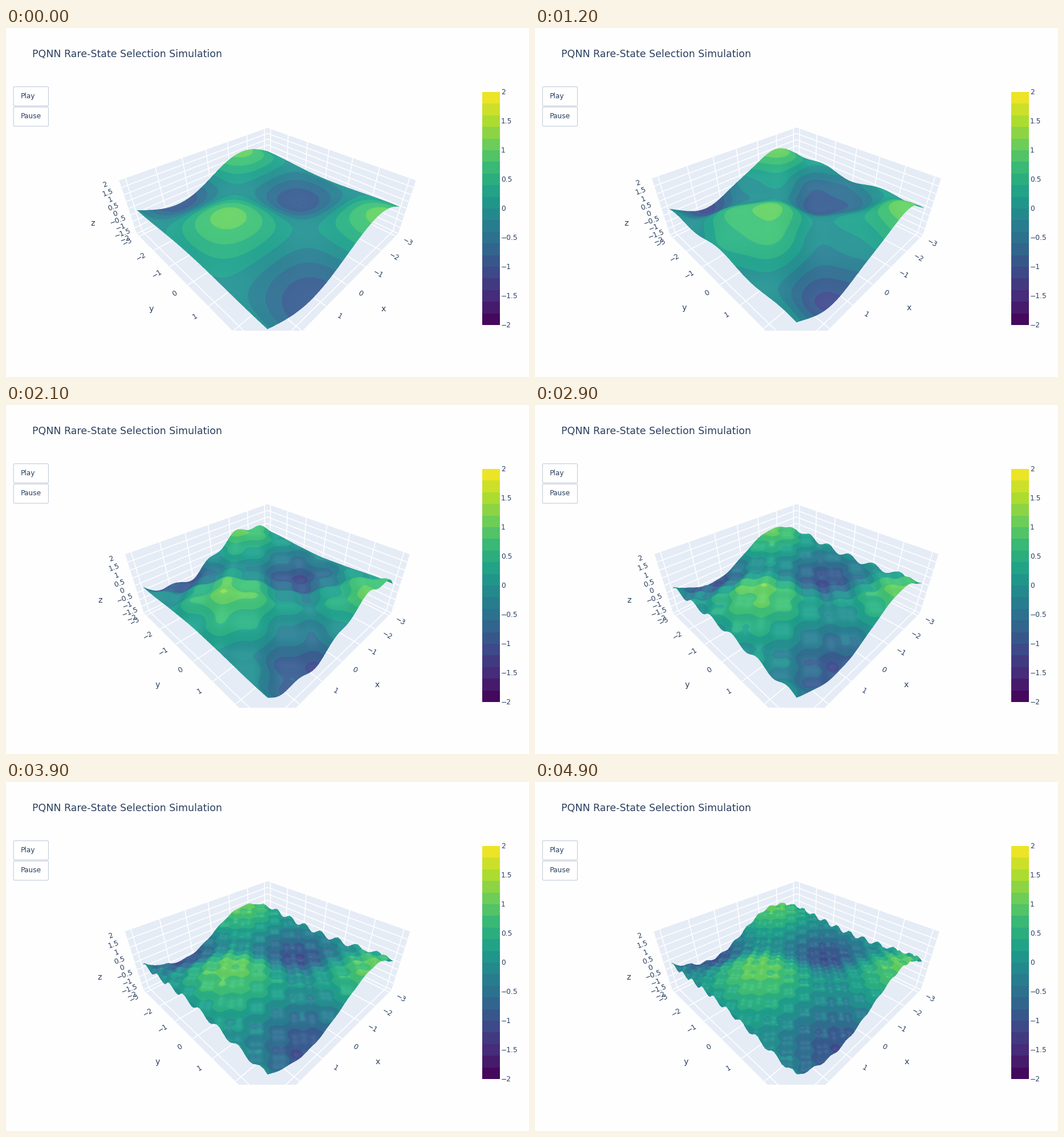
Recreate the animation shown at these times as a matplotlib script. Size 917 px wide and 611 px high, loop 5000 ms.

```python
import numpy as np
import matplotlib.pyplot as plt
from matplotlib.animation import FuncAnimation
from matplotlib.collections import LineCollection
from matplotlib.colors import to_rgb
from matplotlib.patches import FancyBboxPatch, Polygon, Rectangle

W, H, DPI = 917, 611, 100
FRAMES, INTERVAL = 50, 100
UNIT = W / 900                       # layout unit in pixels
INK, PANE = "#2a3f5f", "#e5ecf6"
plt.rcParams["font.family"] = "DejaVu Sans"

STOPS = ["#440154", "#482878", "#3e4989", "#31688e", "#26828e",
         "#1f9e89", "#35b779", "#6ece58", "#b5de2b", "#fde725"]
STOP_RGB = np.array([to_rgb(c) for c in STOPS])


def colormap(z):
    """Colour for heights between -2 and 2."""
    pos = (np.asarray(z) + 2) / 4
    grid = np.linspace(0, 1, len(STOPS))
    return np.stack([np.interp(pos, grid, STOP_RGB[:, i]) for i in range(3)], -1)


# Scene camera
CX, CY = W / 2, 310 * UNIT
FOCAL = 210 * UNIT / np.tan(np.pi / 8)
EYE = 1.25 * np.sqrt(3)
LIM = 3 * (1 + 1 / 16)


def project(total, diff, z):
    """Screen position from x + y, y - x and z in scene units."""
    scale = FOCAL / (EYE - (total + z) / np.sqrt(3))
    return CX + scale * diff / np.sqrt(2), CY + scale * (total - 2 * z) / np.sqrt(6)


# Surface: coarse mesh, sampled finely between its nodes
NODES = np.linspace(-3, 3, 50)
SAMPLES = 1000
fine = np.linspace(-3, 3, SAMPLES)
TOTAL = (fine[:, None] + fine).astype(np.float32)
DIFF = (fine - fine[:, None]).astype(np.float32)
ORDER = np.arange(SAMPLES ** 2, dtype=np.int32)
BX, BY, BW, BH, SS = 150, 180, 620, 380, 2
LEVELS = 0.07 + 4 / 15 * np.arange(-8, 8)
BAND_RGB = colormap(np.append(LEVELS, LEVELS[-1] + 4 / 15) - 2 / 15)


def heights(k, grid):
    def bend(f):
        return np.interp(grid, NODES, f(NODES)).astype(np.float32)
    return (np.outer(bend(np.sin), bend(np.cos))
            + 0.2 * np.outer(bend(lambda v: np.sin(k * v)), bend(lambda v: np.cos(k * v))))


def render_surface(k, sxy, sz):
    z = heights(k, fine)
    px, py = project(TOTAL * np.float32(sxy), DIFF * np.float32(sxy), z * np.float32(sz))
    col = np.clip((px - BX) * SS, 0, BW * SS - 1).astype(np.int32)
    row = np.clip((py - BY) * SS, 0, BH * SS - 1).astype(np.int32)
    # Samples run from back to front, so the nearest one is kept
    front = np.full(BW * BH * SS * SS, -1, np.int32)
    front[(row * (BW * SS) + col).ravel()] = ORDER
    front = front.reshape(BH * SS, BW * SS)
    left, mid, right = front[:, :-2], front[:, 1:-1], front[:, 2:]
    front[:, 1:-1] = np.where((mid < 0) & (left >= 0) & (right >= 0), left, mid)

    seen = front >= 0
    hit = front[seen]
    ix, iy = hit // SAMPLES, hit % SAMPLES
    rgb = BAND_RGB[np.searchsorted(LEVELS, z.ravel()[hit])]

    sin, cos, ksin, kcos = np.sin(fine), np.cos(fine), np.sin(k * fine), np.cos(k * fine)
    gx = cos[ix] * cos[iy] + 0.2 * k * kcos[ix] * kcos[iy]
    gy = sin[ix] * sin[iy] + 0.2 * k * ksin[ix] * ksin[iy]
    tilt = (gx ** 2 + gy ** 2) * (sz / sxy) ** 2
    gloss = 0.055 * np.exp(-4 * tilt) * (1 + tilt) ** 2

    img = np.zeros((BH * SS, BW * SS, 4), np.float32)
    img[seen, :3] = np.minimum(rgb + gloss[:, None], 1)
    img[seen, 3] = 1
    img = img.reshape(BH, SS, BW, SS, 4).mean((1, 3))
    img[..., :3] /= np.maximum(img[..., 3:], 1e-6)
    return np.clip(img, 0, 1)


fig = plt.figure(figsize=(W / DPI, H / DPI), dpi=DPI, facecolor="#fefefe")
ax = fig.add_axes([0, 0, 1, 1])
ax.set_xlim(0, W)
ax.set_ylim(H, 0)
ax.axis("off")


def label(x, y, s, px=12.2, **kw):
    return ax.text(x, y, s, fontsize=px * 72 / DPI, color=INK, **kw)


def number(v):
    return f"{v:g}".replace("-", "\u2212")


# Title, buttons and colour bar
label(45.8, 50.8, "PQNN Rare-State Selection Simulation", 17.4)
for top, name in ((102.8, "Play"), (138.4, "Pause")):
    ax.add_patch(FancyBboxPatch((13.2, top), 61.2, 33.6, fc="white", ec="#bec8d9",
                                lw=0.75, boxstyle="round,pad=0,rounding_size=2"))
    label(25.5, top + 20, name)

BAR_TOP, BAR_H = 110 * UNIT, 400 * UNIT
bands = colormap(np.arange(1.9, -2, -0.2))
ax.imshow(bands[:, None], extent=(820 * UNIT - 0.6, 850 * UNIT - 0.8, BAR_TOP + BAR_H, BAR_TOP),
          aspect="auto", interpolation="nearest")
for v in np.arange(-2, 2.1, 0.5):
    label(868, BAR_TOP + BAR_H * (2 - v) / 4 + 4.4, number(v))

# Scene artists
window = Rectangle((0, 100 * UNIT), W, 420 * UNIT, transform=ax.transData)
panes = [ax.add_patch(Polygon(np.zeros((4, 2)), fc=PANE, ec=PANE, lw=0.3)) for _ in range(3)]
grid_lines = ax.add_collection(LineCollection([], colors="white", linewidths=1.15))
grid_lines.set_zorder(2)
surface = ax.imshow(np.zeros((BH, BW, 4)), extent=(BX, BX + BW, BY + BH, BY),
                    aspect="auto", interpolation="nearest", zorder=3)
for artist in panes + [grid_lines, surface]:
    artist.set_clip_path(window)
ax.set_xlim(0, W)
ax.set_ylim(H, 0)

Z_TICKS = np.arange(-2, 2.1, 0.5)
XY_TICKS = range(-3, 4)
LABELS = ([("x", v, number(v)) for v in range(-3, 2)]
          + [("y", v, number(v)) for v in range(-3, 2)]
          + [("z", v, number(v)) for v in Z_TICKS]
          + [(axis, 0, axis) for axis in "xyz"])
TURN = {"x": -30, "y": 30, "z": 20}
TURN_X = {"x": 30, "y": 30, "z": 20}
texts = []
for axis, _, s in LABELS:
    title = s == axis
    texts.append(label(0, 0, s, 14.3 if title else 12.2, ha="center", va="center",
                       rotation=0 if title else TURN[axis], rotation_mode="anchor", zorder=4))


def update(frame):
    k = 0.2 * frame
    extent = np.ptp(heights(k, NODES))
    mean = np.cbrt(36 * extent)
    sxy, sz = 6 / mean / (2 * LIM), extent / mean / 4

    def at(x, y, z):
        return project((x + y) * sxy, (y - x) * sxy, z * sz)

    m = LIM
    corners = ([(-m, -m, -2), (m, -m, -2), (m, m, -2), (-m, m, -2)],
               [(-m, -m, -2), (m, -m, -2), (m, -m, 2), (-m, -m, 2)],
               [(-m, -m, -2), (-m, m, -2), (-m, m, 2), (-m, -m, 2)])
    for pane, points in zip(panes, corners):
        pane.set_xy([at(*p) for p in points])

    segments = []
    for v in XY_TICKS:
        segments += [[at(v, m, -2), at(v, -m, -2), at(v, -m, 2)],
                     [at(m, v, -2), at(-m, v, -2), at(-m, v, 2)]]
    for v in Z_TICKS:
        segments.append([at(m, -m, v), at(-m, -m, v), at(-m, m, v)])
    grid_lines.set_segments(segments)

    for text, (axis, v, s) in zip(texts, LABELS):
        out = m + (0.25 if s == axis else 0.095) / sxy
        spot = {"x": (v, out, -2), "y": (out, v, -2), "z": (out, -m, v)}[axis]
        text.set_position(at(*spot))

    surface.set_data(render_surface(k, sxy, sz))
    return [*panes, grid_lines, surface, *texts]


anim = FuncAnimation(fig, update, frames=FRAMES, interval=INTERVAL, repeat=True,
                     repeat_delay=0, blit=False)
plt.show()
```
